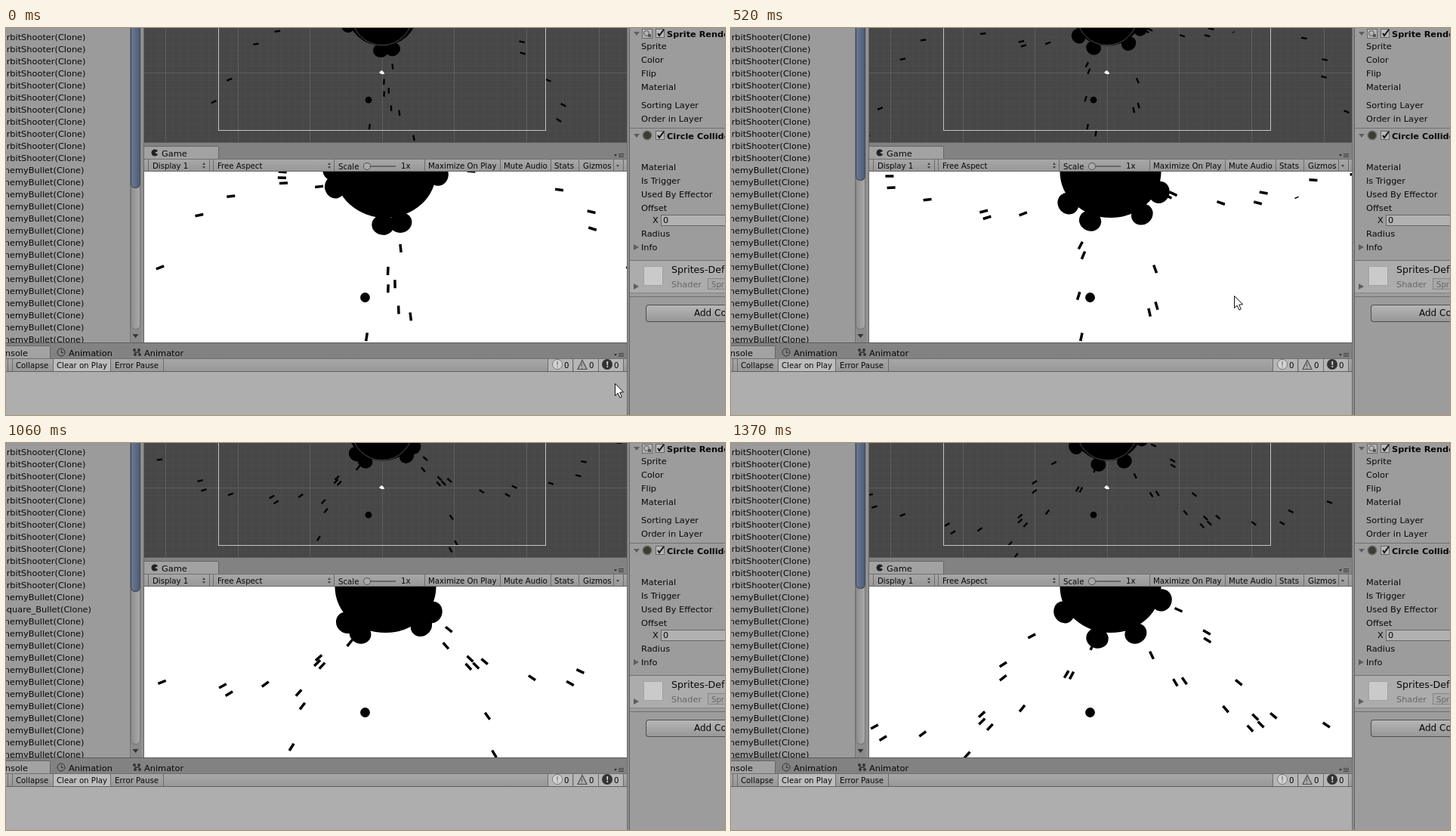
An HTML page with a canvas for the animation above (1450 ms loop, 952 by 512 pixels).

```html
<!DOCTYPE html>
<html lang="en">
<head>
<meta charset="utf-8">
<title>Orbit shooter in the editor</title>
<style>
html, body { margin: 0; width: 100%; height: 100%; overflow: hidden; background: #9b9b9b; }
canvas { display: block; }
</style>
</head>
<body>
<canvas id="stage" width="952" height="512"></canvas>
<script>
const canvas = document.getElementById('stage');
let ctx = canvas.getContext('2d');
const LOOP = 1450;
const STARTS = [0, 70, 150, 220, 300, 370, 450, 520, 600, 670, 750, 830, 910, 990, 1060, 1140, 1220, 1290, 1370];
const KEYS = [0, 370, 520, 750, 910, 1140, 1370];
const TRAVEL = [-2.5, 100, 153, 235, 293, 375, 457.5];   // pixels a bullet has flown
const THUMB = [212, 207, 202, 197, 197, 197, 193];
const CURSOR = {
  t: [0, 370, 520, 600, 750, 910, 990],
  x: [806, 665, 666, 700, 809, 942, 990],
  y: [470, 355, 354, 362, 411, 494, 525]
};

const RAD = Math.PI / 180;
const CENTER = { x: 502, y: 190 };
const ORBIT = 70, SIDE = 9.5, TILT = 7.7, PERIOD = 117;
const ringAngle = { cw: c => 3.1 + 0.1277 * c, ccw: c => 72.9 - 0.1277 * c };

// Each shooter: ring, quarter turn, firing phase, then [delay, angle offset] per shot.
const SHOOTERS = [
  ['cw', 0, 71.5, [[0, -0.7], [-47.5, 0.7], [-52.8, -2.8]]],
  ['cw', 1, 54, [[0, 0], [-52.5, 1.5], [-63.5, -1.7]]],
  ['cw', 2, 94.5, [[0, 0.7], [-46, 2]]],
  ['ccw', -1, 70.5, [[0, -3.3], [-46.5, -4.5], [-53, -1]]],
  ['ccw', 0, 82, [[0, -1], [-46, -2.1], [-51.5, 0.6]]],
  ['ccw', 1, 95, [[0, 0.2], [-46, -1.5], [-47.5, 1.3]]]
];

function track(times, values, t) {
  let i = 1;
  while (i < times.length - 1 && t > times[i]) i++;
  const k = Math.min(1, (t - times[i - 1]) / (times[i] - times[i - 1]));
  return values[i - 1] + (values[i] - values[i - 1]) * k;
}

function rect(x, y, w, h, color) {
  ctx.fillStyle = color;
  ctx.fillRect(x, y, w, h);
}
function shade(x, y, w, h, top, bottom) {
  const g = ctx.createLinearGradient(0, y, 0, y + h);
  g.addColorStop(0, top);
  g.addColorStop(1, bottom);
  rect(x, y, w, h, g);
}
function oval(x, y, rx, ry, angle = 0, color = '#000') {
  ctx.fillStyle = color;
  ctx.beginPath();
  ctx.ellipse(x, y, rx, ry, angle, 0, 7);
  ctx.fill();
}
const disc = (x, y, r, color) => oval(x, y, r, r, 0, color);
function ring(x, y, r, color) {
  ctx.strokeStyle = color;
  ctx.lineWidth = 1;
  ctx.beginPath();
  ctx.arc(x, y, r, 0, 7);
  ctx.stroke();
}
function poly(points, color) {
  ctx.fillStyle = color;
  ctx.beginPath();
  points.forEach(([x, y]) => ctx.lineTo(x, y));
  ctx.closePath();
  ctx.fill();
}
function text(str, x, y, size = 11.35, color = '#080808', weight = 'normal') {
  ctx.font = `${weight} ${size}px "DejaVu Sans", sans-serif`;
  ctx.fillStyle = color;
  ctx.fillText(str, x, y + 4);
}
const small = (str, x, y) => text(str, x, y, 10.2);
const down = (x, y, s = 3, color = '#444') => poly([[x - s, y - s / 2], [x + s, y - s / 2], [x, y + s / 2 + 1]], color);
const up = (x, y, s = 3) => poly([[x - s, y + s / 2], [x + s, y + s / 2], [x, y - s / 2 - 1]], '#444');
const right = (x, y) => poly([[x - 3, y - 4], [x + 4, y], [x - 3, y + 4]], '#5e5e5e');
function spinner(x, y) { up(x, y - 2, 2); down(x, y + 2, 2); }
function dividers(xs, y, h) { xs.forEach(x => rect(x, y, 1, h, '#6c6c6c')); }
function menuIcon(x, y) {
  down(x - 5, y - 1, 2, '#333');
  for (let i = -3; i <= 1; i += 2) rect(x - 1, y + i, 7, 1, '#444');
}
function checkbox(x, y) {
  rect(x - 6, y - 6, 12, 12, '#666');
  rect(x - 5, y - 5, 10, 10, '#b9b9b9');
  ctx.strokeStyle = '#111';
  ctx.lineWidth = 2;
  ctx.beginPath();
  ctx.moveTo(x - 3, y);
  ctx.lineTo(x - 1, y + 3);
  ctx.lineTo(x + 5, y - 5);
  ctx.stroke();
}

function drawGameBar() {
  rect(183, 152, 639, 21, '#828282');
  rect(183, 151, 639, 1, '#5d5d5d');
  rect(183, 157, 98, 16, '#a2a2a2');
  rect(183, 156, 98, 1, '#666');
  rect(281, 157, 1, 16, '#666');
  disc(197, 165, 4.5, '#222');
  poly([[197, 165], [203, 162], [203, 168]], '#a2a2a2');
  text('Game', 206, 166);
  menuIcon(812, 169);
  shade(183, 173, 639, 17, '#a8a8a8', '#989898');
  rect(183, 173, 639, 1, '#707070');
  rect(183, 189, 639, 1, '#686868');
  dividers([188, 269, 274, 434, 554, 654, 721, 758, 804, 817], 174, 15);
  [['Display 1', 194], ['Free Aspect', 280], ['1x', 523], ['Maximize On Play', 559],
   ['Mute Audio', 659], ['Stats', 726], ['Gizmos', 764]].forEach(([s, x]) => small(s, x, 182));
  small('Scale', 440, 183);
  spinner(262, 182);
  spinner(428, 182);
  down(810, 182, 2);
  rect(480, 182, 36, 2, '#666');
  disc(478, 183, 5, '#555');
  disc(478, 183, 4, '#aaa');
}

function drawConsole() {
  rect(0, 416, 823, 21, '#828282');
  rect(0, 416, 823, 1, '#5c5c5c');
  rect(0, 421, 58, 16, '#a2a2a2');
  rect(0, 420, 58, 1, '#666');
  rect(58, 421, 1, 16, '#666');
  ctx.textAlign = 'right';
  text('Console', 29, 430);
  ctx.textAlign = 'left';
  ring(73, 429, 5, '#333');
  rect(73, 426, 1, 4, '#333');
  rect(73, 429, 3, 1, '#333');
  text('Animation', 83, 430);
  [[170, 426], [176, 426], [171, 432], [177, 432]].forEach(([x, y]) => disc(x, y, 2, '#333'));
  rect(170, 428, 7, 2, '#444');
  text('Animator', 183, 430);
  menuIcon(812, 433);
  shade(0, 437, 823, 17, '#a8a8a8', '#989898');
  rect(0, 437, 823, 1, '#707070');
  rect(63, 438, 75, 16, '#bdbdbd');
  [718, 752, 785].forEach(x => rect(x, 438, 32, 16, '#b6b6b6'));
  dividers([2, 8, 62, 138, 208, 717, 750, 784, 817], 438, 16);
  small('Collapse', 13, 446);
  small('Clear on Play', 67, 446);
  small('Error Pause', 144, 446);
  disc(730, 445, 6.5, '#d2d2d2');
  ring(730, 445, 6.5, '#777');
  text('!', 728, 445, 10, '#555');
  poly([[763, 438], [770, 452], [756, 452]], '#555');
  poly([[763, 441], [768, 451], [758, 451]], '#aaa');
  text('!', 761, 447, 8, '#444');
  disc(796, 445, 7, '#333');
  text('!', 794, 445, 10, '#ddd', 'bold');
  [739, 772, 805].forEach(x => small('0', x, 446));
  rect(0, 454, 823, 58, '#aeaeae');
  rect(0, 454, 823, 1, '#606060');
}

function drawInspector() {
  rect(822, 0, 4, 512, '#8b8b8b');
  rect(822, 0, 1, 512, '#707070');
  rect(825, 0, 1, 512, '#626262');
  rect(826, 0, 126, 512, '#9c9c9c');
  down(835, 7, 4, '#5e5e5e');
  rect(842, 1, 14, 13, '#6a6a6a');
  rect(843, 2, 12, 11, '#b4b4b4');
  ring(848, 7, 3.5, '#555');
  rect(850, 8, 4, 4, '#555');
  checkbox(866, 7);
  text('Sprite Renderer', 875, 8, 11.3, '#080808', 'bold');
  rect(826, 132, 126, 1, '#707070');
  down(835, 142, 4, '#5e5e5e');
  disc(849, 142, 6.5, '#6d6d62');
  disc(849, 142, 5, '#3c3c36');
  checkbox(866, 142);
  text('Circle Collider 2D', 875, 143, 11.3, '#080808', 'bold');
  [['Sprite', 24], ['Color', 42], ['Flip', 60], ['Material', 78], ['Sorting Layer', 102],
   ['Order in Layer', 120], ['Material', 184], ['Is Trigger', 202], ['Used By Effector', 220],
   ['Offset', 238], ['Radius', 272], ['Info', 290]].forEach(([s, y]) => text(s, 841, y));
  text('X', 856, 254);
  rect(867, 247, 85, 15, '#666');
  rect(868, 248, 84, 13, '#b1b1b1');
  text('0', 870, 254);
  right(834, 290);
  rect(826, 307, 126, 1, '#707070');
  rect(826, 308, 126, 42, '#acacac');
  rect(844, 315, 26, 26, '#a2a2a2');
  rect(845, 316, 24, 24, '#cacaca');
  text('Sprites-Default', 881, 320, 12.6);
  text('Shader', 881, 339, 11.3, '#666');
  rect(929, 331, 23, 15, '#858585');
  rect(930, 332, 22, 13, '#a8a8a8');
  text('Sprites', 934, 339, 10.15, '#666');
  right(834, 342);
  rect(826, 350, 126, 1, '#858585');
  rect(826, 355, 126, 1, '#707070');
  ctx.fillStyle = '#4f4f4f';
  ctx.beginPath();
  ctx.roundRect(847, 366, 130, 23, 4);
  ctx.fill();
  const g = ctx.createLinearGradient(0, 367, 0, 388);
  g.addColorStop(0, '#b6b6b6');
  g.addColorStop(1, '#979797');
  ctx.fillStyle = g;
  ctx.beginPath();
  ctx.roundRect(848, 367, 130, 21, 3);
  ctx.fill();
  text('Add Component', 911, 377, 12);
}

function buildChrome() {
  const layer = document.createElement('canvas');
  layer.width = 952;
  layer.height = 512;
  const main = ctx;
  ctx = layer.getContext('2d');
  rect(0, 0, 952, 512, '#9b9b9b');
  drawGameBar();
  drawConsole();
  drawInspector();
  ctx = main;
  return layer;
}

function drawHierarchy(t) {
  const squareRow = t >= 1220 || t < 910 ? -1 : t >= 1060 ? 13 : 17;
  ctx.save();
  ctx.beginPath();
  ctx.rect(0, 0, 164, 416);
  ctx.clip();
  ctx.textAlign = 'right';
  for (let row = 0; row < 26; row++) {
    const orbit = row < 11 || (row === 11 && t >= 910) || (row === 21 && t >= 750 && t < 830);
    const y = 12 + row * 16;
    if (row === squareRow) text('Square_Bullet(Clone)', 113, y);
    else if (orbit) text('OrbitShooter(Clone)', 105.5, y);
    else text('EnemyBullet(Clone)', 103.5, y);
  }
  ctx.restore();

  const end = Math.round(track(KEYS, THUMB, t));
  rect(164, 0, 15, 416, '#8b8b8b');
  rect(164, 0, 1, 416, '#747474');
  const bar = (bottom, edge, from, to) => {
    const g = ctx.createLinearGradient(165, 0, 178, 0);
    g.addColorStop(0, from);
    g.addColorStop(1, to);
    ctx.fillStyle = edge;
    ctx.beginPath();
    ctx.roundRect(165, -10, 13, bottom + 10, 6);
    ctx.fill();
    ctx.fillStyle = g;
    ctx.beginPath();
    ctx.roundRect(166, -10, 11, bottom + 9, 5);
    ctx.fill();
  };
  bar(399, '#777', '#8c8c8c', '#acacac');
  bar(end, '#3d4656', '#6d7b95', '#4c5a74');
  down(171.5, 407, 4, '#333');
  rect(179, 0, 3, 416, '#919191');
  rect(182, 0, 1, 416, '#666');
}

function slab(x, y, angle, length, width) {
  ctx.save();
  ctx.translate(x, y);
  ctx.rotate(angle);
  rect(-length / 2, -width / 2, length, width, '#000');
  ctx.restore();
}

function drawBullets(c) {
  for (const [kind, quarter, phase, shots] of SHOOTERS) {
    for (const [delay, offset] of shots) {
      for (let n = -5; n < 5; n++) {
        const fired = phase + delay + n * PERIOD;
        const r = ORBIT + c - fired;
        if (r < ORBIT || r > 640) continue;
        const a = (ringAngle[kind](fired) + quarter * 90 + TILT + offset) * RAD;
        slab(CENTER.x + r * Math.cos(a) + SIDE * Math.sin(a),
             CENTER.y + r * Math.sin(a) - SIDE * Math.cos(a), a, 11, 3.5);
      }
    }
  }
}

function drawWorld(c) {
  oval(CENTER.x, CENTER.y, 67, 60.5);
  for (const kind in ringAngle) {
    for (let q = 0; q < 4; q++) {
      const a = (ringAngle[kind](c) + q * 90) * RAD;
      oval(CENTER.x + ORBIT * Math.cos(a), CENTER.y + ORBIT * Math.sin(a), 13.4, 14.8, a);
    }
  }
  drawBullets(c);
  disc(475, 356, 6.4);
  const aim = Math.atan2(-87, 180), flown = (c + 2) * 1.96;
  if (flown > 6) slab(475 + flown * Math.cos(aim), 356 + flown * Math.sin(aim), aim, 5.5, 1.5);
}

function view(x, y, w, h, background, draw) {
  ctx.save();
  ctx.beginPath();
  ctx.rect(x, y, w, h);
  ctx.clip();
  rect(x, y, w, h, background);
  draw();
  ctx.restore();
}

function drawGrid(step, color) {
  for (let x = 211 - Math.floor(28 / step) * step; x < 822; x += step) rect(Math.round(x), 0, 1, 151, color);
  for (let y = 59 - Math.floor(59 / step) * step; y < 151; y += step) rect(183, Math.round(y), 639, 1, color);
}

function drawScene(c) {
  drawGrid(9.56, '#4b4b4b');
  drawGrid(95.6, '#5e5e5e');
  ctx.save();
  ctx.translate(281.5, 135.5);
  ctx.scale(0.6785, 0.6785);
  ctx.translate(-182.5, -415.5);
  drawWorld(c);
  ctx.restore();
  ring(498, -17.5, 40.3, '#4c4c4c');
  ctx.strokeStyle = '#c4c4c4';
  ctx.strokeRect(281.5, -20, 433, 155.5);
  poly([[494, 59], [497, 56], [500, 58], [501, 61], [497, 61]], '#fff');
}

function drawGame(c) {
  ctx.translate(0.5, 0.5);
  drawWorld(c);
}

function drawCursor(t) {
  const x = Math.round(track(CURSOR.t, CURSOR.x, t));
  const y = Math.round(track(CURSOR.t, CURSOR.y, t));
  const tip = [[0, 0], [0, 16], [3.6, 12.6], [6.4, 18.6], [8.8, 17.4], [6.2, 11.6], [11, 11.2]];
  poly(tip.map(([dx, dy]) => [x + dx + 0.5, y + dy + 0.5]), '#fff');
  ctx.strokeStyle = '#111';
  ctx.lineWidth = 1;
  ctx.stroke();
}

const chrome = buildChrome();

function render(now) {
  const time = now % LOOP;
  const t = STARTS.filter(s => s <= time).pop();
  const c = track(KEYS, TRAVEL, t);
  ctx.drawImage(chrome, 0, 0);
  drawHierarchy(t);
  view(183, 0, 639, 151, '#474747', () => drawScene(c));
  view(183, 190, 639, 226, '#fff', () => drawGame(c));
  drawCursor(t);
}

const begin = performance.now();
function loop() {
  render(performance.now() - begin);
  requestAnimationFrame(loop);
}
loop();
</script>
</body>
</html>
```
